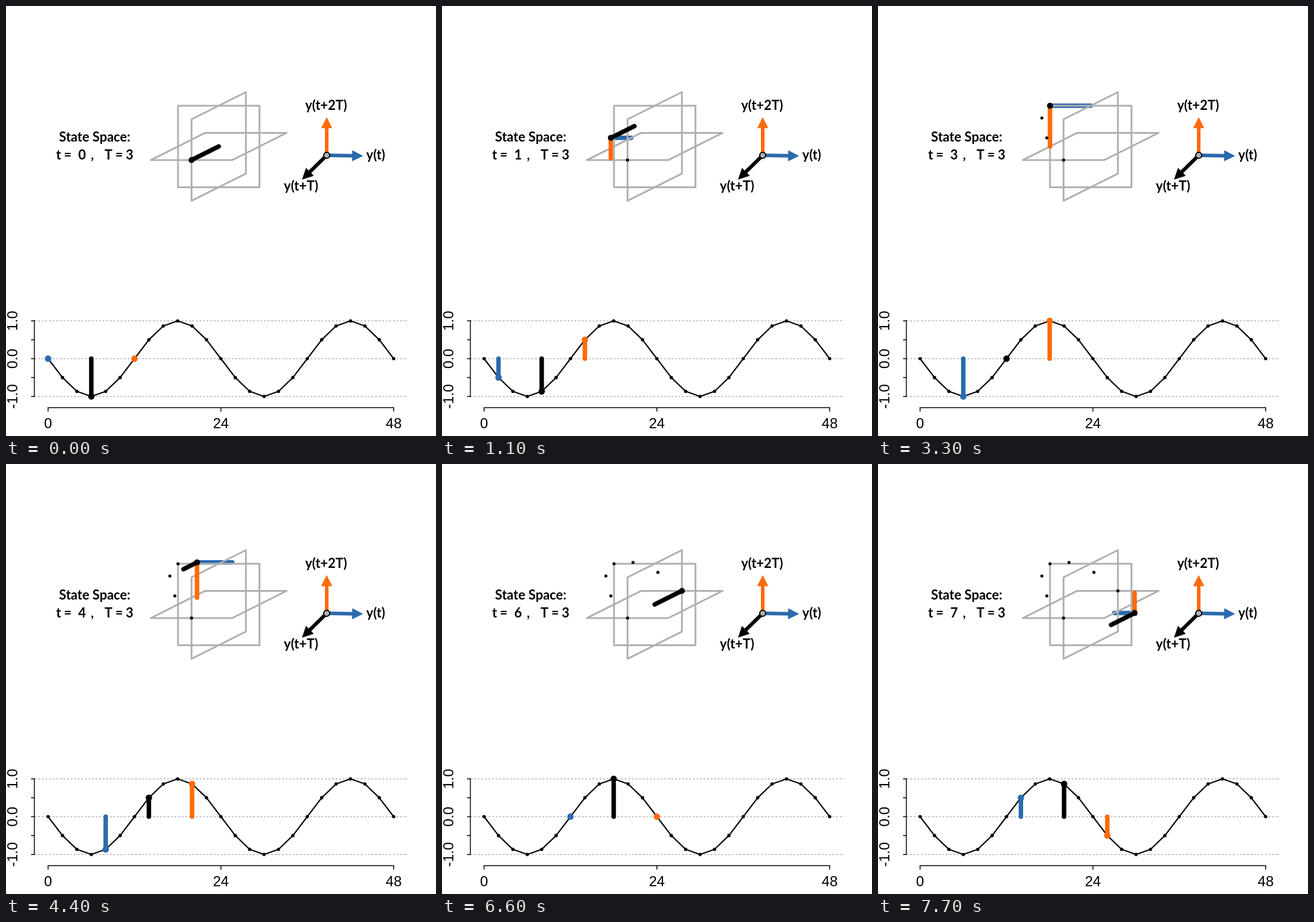
An HTML page for the animation above (8000 ms loop, 720 px wide and 720 px high).

```html
<!DOCTYPE html>
<html lang="en">
<head>
<meta charset="utf-8">
<title>State space</title>
<style>
  html, body { margin: 0; width: 100%; height: 100%; overflow: hidden; background: #fff; }
  svg { display: block; width: 100%; height: 100%; }
  .label { font: 700 22px Lato, sans-serif; }
  .axis { font: 24px "Liberation Sans", Arial, sans-serif; text-anchor: middle; }
  .mid { text-anchor: middle; }
</style>
</head>
<body>
<svg id="stage" viewBox="0 0 720 720"></svg>
<script>
const STEP = 1100, LOOP = 8000, LAG = 3;
const BLUE = "#2b6aad", ORANGE = "#ff6a0a", BLACK = "#000", GRAY = "#b0b0b0";
const C = { x: 356.2, y: 235.2 }, UNIT = 68.2, DX = 45.5, DY = 22.75;
const stage = document.getElementById("stage");

function add(parent, tag, attrs, text) {
  const el = document.createElementNS("http://www.w3.org/2000/svg", tag);
  for (const key in attrs) el.setAttribute(key, attrs[key]);
  if (text !== undefined) el.textContent = text;
  parent.appendChild(el);
  return el;
}
const group = () => add(stage, "g", {});
const line = (g, x1, y1, x2, y2, stroke, width, more) =>
  add(g, "line", { x1, y1, x2, y2, stroke, "stroke-width": width, ...more });
const dot = (g, x, y, r, fill) => add(g, "circle", { cx: x, cy: y, r, fill });
const label = (x, y, text, mid) =>
  add(stage, "text", { x, y, class: mid ? "label mid" : "label" }, text);

function bar(g, x1, y1, x2, y2, color) {
  if (Math.hypot(x2 - x1, y2 - y1) > 1)
    line(g, x1, y1, x2, y2, color, 7.5, { "stroke-linecap": "round" });
}

const signal = k => -Math.sin(Math.PI * k / 6);
const chartX = k => 70.5 + 24.11 * k;
const chartY = v => 590.5 - 63.3 * v;

// Point in the oblique projection of (y(t), y(t+T), y(t+2T))
const project = (a, b, c) => [C.x + UNIT * a + DX * b, C.y - DY * b - UNIT * c];
const statePoint = k => project(signal(k), signal(k + LAG), signal(k + 2 * LAG));

function drawPlanes() {
  const corners = [[-1, -1], [-1, 1], [1, 1], [1, -1]];
  const planes = [(u, v) => [u, 0, v], (u, v) => [0, u, v], (u, v) => [u, v, 0]];
  for (const plane of planes) {
    const points = corners.map(([u, v]) => project(...plane(u, v))).join(" ");
    add(stage, "polygon", { points, fill: "none", stroke: GRAY, "stroke-width": 3, "stroke-linejoin": "round" });
  }
}

function arrow(angle, length, color) {
  const g = add(stage, "g", { transform: `translate(537 250) rotate(${angle})` });
  line(g, 0, 0, length - 17, 0, color, 6);
  add(g, "path", { d: `M${length} 0l-18.5 -9.3v18.6z`, fill: color });
}

function drawCompass() {
  arrow(-90, 64, ORANGE);
  arrow(1, 61, BLUE);
  arrow(135.5, 58, BLACK);
  add(stage, "circle", { cx: 537, cy: 250, r: 5, fill: GRAY, stroke: BLACK, "stroke-width": 2 });
  label(536, 174, "y(t+2T)", true);
  label(619, 257, "y(t)", true);
  label(494, 309, "y(t+T)", true);
}

function drawChart() {
  for (const v of [-1, 0, 1]) {
    const y = chartY(v);
    line(stage, 48, y, 673, y, GRAY, 1.5, { "stroke-dasharray": "3 3" });
    add(stage, "text", { class: "axis", transform: `translate(19 ${y}) rotate(-90)` }, v.toFixed(1));
  }
  line(stage, 47.5, chartY(1), 47.5, chartY(-1), BLACK, 1.5, { "stroke-linecap": "square" });
  for (let v = -1; v <= 1; v += 0.5) line(stage, 42, chartY(v), 48, chartY(v), BLACK, 1.5);
  line(stage, chartX(0), 672.5, chartX(24), 672.5, BLACK, 1.5, { "stroke-linecap": "square" });
  for (const k of [0, 12, 24]) {
    line(stage, chartX(k), 672, chartX(k), 679, BLACK, 1.5);
    add(stage, "text", { class: "axis", x: chartX(k), y: 707 }, 2 * k);
  }
  const pts = Array.from({ length: 25 }, (_, k) => [chartX(k), chartY(signal(k))]);
  add(stage, "polyline", { points: pts.join(" "), fill: "none", stroke: BLACK, "stroke-width": 2.2, "stroke-linejoin": "round" });
  for (const [x, y] of pts) dot(stage, x, y, 2.8, BLACK);
}

label(148.5, 227, "State Space:", true);
label(84, 257, "t");
label(97, 257, "=");
const counter = label(127.5, 257, "0", true);
label(142, 257, ",");
label(165, 257, "T");
label(183, 257, "=");
label(207, 257, "3", true);

const behind = group();
drawPlanes();
const front = group();
drawCompass();
drawChart();
const stems = group();

function show(t) {
  for (const g of [behind, front, stems]) g.replaceChildren();
  counter.textContent = t;

  const [a, b, c] = [0, 1, 2].map(i => signal(t + i * LAG));
  const [x, y] = statePoint(t);
  bar(behind, x, y, x - UNIT * a, y, BLUE);
  bar(front, x, y, x, y + UNIT * c, ORANGE);
  bar(front, x, y, x - DX * b, y + DY * b, BLACK);
  for (let k = 0; k < t; k++) dot(front, ...statePoint(k), 2.6, BLACK);
  dot(front, x, y, 5, BLACK);

  [BLUE, BLACK, ORANGE].forEach((color, i) => {
    const k = t + i * LAG, px = chartX(k), py = chartY(signal(k));
    bar(stems, px, chartY(0), px, py, color);
    dot(stems, px, py, 5.4, color);
  });
}

let shown = -1;
const start = performance.now();
function tick() {
  const t = Math.floor(((performance.now() - start) % LOOP) / STEP);
  if (t !== shown) show(shown = t);
  requestAnimationFrame(tick);
}
tick();
</script>
</body>
</html>
```
